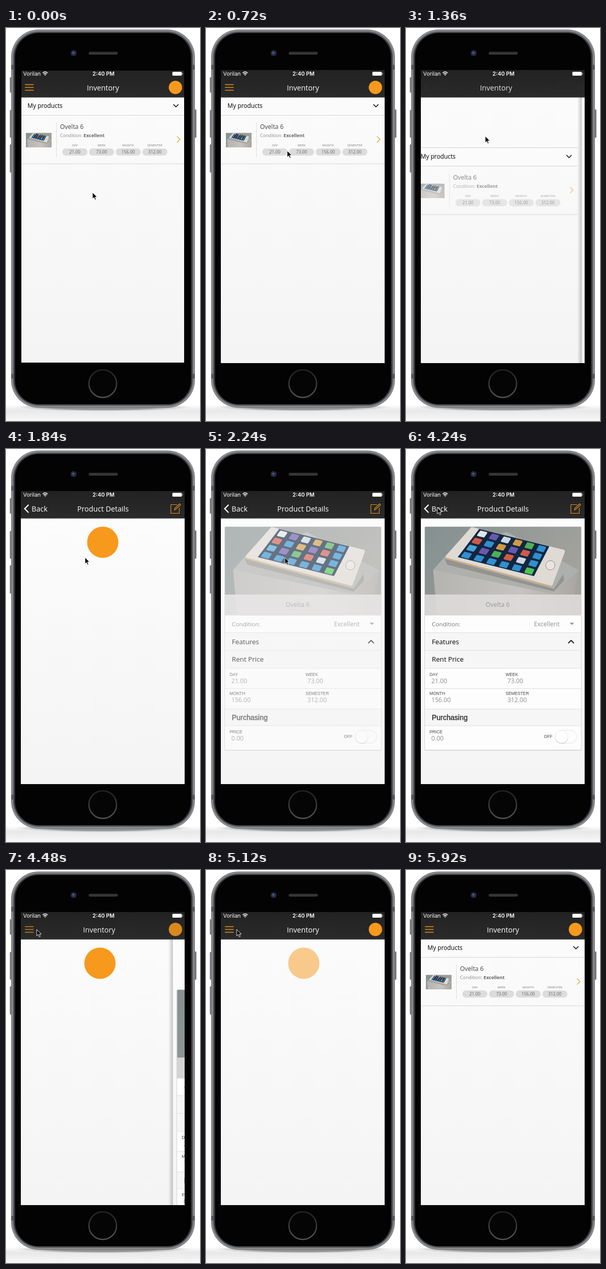
These frames come from a looping animation (379 px wide and 767 px high, 6 s). An HTML page:

```html
<!DOCTYPE html>
<html lang="en">
<head>
<meta charset="utf-8">
<title>Inventory app</title>
<style>
  html, body { margin: 0; width: 100%; height: 100%; overflow: hidden; background: #fff; }
  svg { display: block; width: 379px; height: 767px; }
  text { font-family: "Open Sans", "Noto Sans", sans-serif; }
  .status { font-family: Inter, sans-serif; font-size: 10.5px; fill: #fff; }
  .caps { font-family: "Liberation Sans", Arial, sans-serif; font-size: 8.3px; fill: #444; }
  .title { font-size: 14.2px; fill: #fff; }
  .head { font-size: 13.2px; fill: #000; }
  .value { font-size: 12.1px; fill: #8e8e8e; }
  .mid { text-anchor: middle; }
  .line { fill: none; stroke-linecap: round; stroke-linejoin: round; }
</style>
</head>
<body>
<svg viewBox="0 0 379 767" xmlns="http://www.w3.org/2000/svg">
  <defs>
    <linearGradient id="floor" x2="0" y2="1">
      <stop offset="0" stop-color="#e2e2e2" stop-opacity="0"/><stop offset=".35" stop-color="#e8e8e8"/><stop offset="1" stop-color="#f8f8f8"/>
    </linearGradient>
    <radialGradient id="contact">
      <stop offset=".6" stop-color="#555" stop-opacity=".6"/><stop offset="1" stop-color="#999" stop-opacity="0"/>
    </radialGradient>
    <linearGradient id="page" x2="0" y2="1">
      <stop offset="0" stop-color="#fcfcfc"/><stop offset="1" stop-color="#f4f4f4"/>
    </linearGradient>
    <linearGradient id="bar" x2="0" y2="1">
      <stop offset="0" stop-color="#222"/><stop offset="1" stop-color="#2a2a2a"/>
    </linearGradient>
    <linearGradient id="edge">
      <stop offset="0" stop-color="#000" stop-opacity="0"/><stop offset="1" stop-color="#000" stop-opacity=".22"/>
    </linearGradient>
    <linearGradient id="drop" x2="0" y2="1">
      <stop offset="0" stop-color="#000" stop-opacity=".1"/><stop offset="1" stop-color="#000" stop-opacity="0"/>
    </linearGradient>
    <linearGradient id="wall" x2="1" y2=".4">
      <stop offset="0" stop-color="#849090"/><stop offset="1" stop-color="#a3a29d"/>
    </linearGradient>
    <linearGradient id="boxFront" x2="1" y2="0">
      <stop offset="0" stop-color="#b5b4b1"/><stop offset=".6" stop-color="#c6c3c0"/><stop offset="1" stop-color="#a9a5a1"/>
    </linearGradient>
    <linearGradient id="rim" x2="0" y2="1">
      <stop offset="0" stop-color="#222"/><stop offset="1" stop-color="#555"/>
    </linearGradient>
    <clipPath id="screen"><rect x="29" y="82" width="320" height="572"/></clipPath>
    <clipPath id="photoClip"><rect width="305" height="172" rx="1"/></clipPath>
    <g id="photo" clip-path="url(#photoClip)">
      <rect width="305" height="172" fill="url(#wall)"/>
      <path d="M16 84L50 46L160 10L300 84L284 172H24Z" fill="#aeb0ad"/>
      <path d="M16 84L246 130L300 86L284 172H24Z" fill="url(#boxFront)"/>
      <path d="M38 62L252 121L270 92L272 104L252 126L44 74Z" fill="#7c7873" opacity=".5"/>
      <path d="M44 58L92 4L270 48L246 112Z" fill="#dfdad4" stroke="#dfdad4" stroke-width="7" stroke-linejoin="round"/>
      <path class="line" d="M41 61L246 116" stroke="#cfae80" stroke-width="2.5"/>
      <path d="M106 4L243 38L213 96L64 59Z" fill="#13263f"/>
      <g id="icons"></g>
      <circle cx="245" cy="75" r="9" fill="#e8e4df" stroke="#8f8981"/>
    </g>
  </defs>

  <rect y="736" width="379" height="31" fill="url(#floor)"/>
  <ellipse cx="189.500" cy="740" rx="172" ry="8" fill="url(#contact)"/>
  <g fill="#77797c">
    <rect x="7.500" y="96" width="5" height="30" rx="1.500"/><rect x="7.500" y="160" width="5" height="54" rx="1.500"/>
    <rect x="7.500" y="227" width="5" height="55" rx="1.500"/><rect x="367" y="159" width="5" height="55" rx="1.500"/>
  </g>
  <rect x="10" y="3" width="359" height="738" rx="54" fill="#66686b"/>
  <rect x="12" y="5" width="355" height="734" rx="52" fill="none" stroke="#929496" stroke-width="2"/>
  <path d="M10 72h6v9h-6zM363 72h6v9h-6zM10 675h6v9h-6zM363 675h6v9h-6z" fill="#55575a"/>
  <rect x="15.500" y="8.500" width="348" height="727" rx="48" fill="#2c2d2f"/>
  <rect x="18" y="10" width="343" height="724" rx="46" fill="#030303"/>
  <circle cx="132" cy="49" r="6" fill="#24262d"/><circle cx="132" cy="49" r="3.500" fill="#27376f"/><circle cx="131.500" cy="48" r="1.300" fill="#6879b5"/>
  <rect x="161.500" y="46.500" width="57" height="5.500" rx="2.750" fill="#353535"/>
  <circle cx="189" cy="694" r="27" fill="#050505" stroke="url(#rim)" stroke-width="2.500"/>

  <g clip-path="url(#screen)">
    <rect x="29" y="82" width="320" height="573" fill="url(#page)"/>

    <g id="listPage">
      <circle id="listLoader" cx="191" cy="182" r="30.500" fill="#f7991c"/>
      <g id="list">
        <rect x="29" y="135" width="320" height="35" fill="#fbfbfb"/>
        <path d="M29 134.500H349M29 170.500H349M29 265H349" stroke="#d3d3d3"/>
        <text x="42" y="156" font-size="11.8" fill="#000">My products</text>
        <path class="line" d="M327.500 149.500l4.500 4.500 4.500-4.500" stroke="#111" stroke-width="1.700"/>
        <g id="row">
          <use href="#photo" transform="translate(38.700 204.500) scale(.165)"/>
          <path d="M98.500 184V252" stroke="#ddd"/>
          <text x="105.500" y="197" font-size="12" fill="#444">Ovelta 6</text>
          <text x="105.500" y="213" font-size="9.100" fill="#888">Condition: <tspan font-weight="700" fill="#666">Excellent</tspan></text>
          <g id="pills"></g>
          <path class="line" d="M334.500 212l5.500 5.500-5.500 5.500" stroke="#eca23a" stroke-width="1.400"/>
        </g>
      </g>
    </g>

    <g id="detailPage">
      <rect x="20" y="135" width="9" height="520" fill="url(#edge)"/>
      <rect x="29" y="135" width="320" height="520" fill="url(#page)"/>
      <circle id="detailLoader" cx="189" cy="182" r="30.500" fill="#f7991c"/>
      <g id="card">
        <rect x="36" y="152" width="307" height="437" rx="2" fill="#000" opacity=".1"/>
        <rect x="36.500" y="151.500" width="306" height="436" rx="2" fill="#fdfdfd" stroke="#d6d6d6"/>
        <use href="#photo" x="37" y="152"/>
        <rect x="37" y="284" width="305" height="40" fill="#e0dcdc" opacity=".88"/>
        <text class="mid" x="179" y="308" font-size="12.300" fill="#999">Ovelta 6</text>
        <path d="M37 358h305v70h-305zM37 508h305v32h-305z" fill="#f6f6f6"/>
        <path d="M37 324.500H342M37 358.500H342M37 393H342M37 428H342M37 467.500H342M37 507.500H342M37 540H342" stroke="#dedede"/>
        <text x="50.500" y="346" font-size="11.600" fill="#777">Condition:</text>
        <text class="value" x="250" y="346">Excellent</text>
        <path d="M319.500 339h9l-4.500 4.500z" fill="#999"/>
        <text class="head" x="50.500" y="381">Features</text>
        <path class="line" d="M317.500 378.500l5-5 5 5" stroke="#111" stroke-width="1.800"/>
        <text class="head" x="50.500" y="415">Rent Price</text>
        <g id="prices"></g>
        <text x="50.500" y="529" font-size="14" fill="#222" stroke="#222" stroke-width=".3" style="font-family:'Liberation Sans',Arial,sans-serif">Purchasing</text>
        <text class="caps" x="269.500" y="564">OFF</text>
        <rect x="291.500" y="549" width="42" height="25" rx="12.500" fill="#fdfdfd" stroke="#e4e4e4"/>
        <circle cx="304" cy="563" r="12.500" fill="#000" opacity=".14"/>
        <circle cx="304" cy="561.500" r="12.300" fill="#fff" stroke="#ddd" stroke-width=".6"/>
      </g>
    </g>

    <rect x="29" y="82" width="320" height="53.500" fill="url(#bar)"/>
    <rect x="29" y="135.500" width="320" height="3" fill="url(#drop)"/>
    <g id="listButtons">
      <path class="line" d="M37.500 110.500h16M37.500 116h16M37.500 121.500h16" stroke="#e9921d" stroke-width="1.500"/>
      <circle cx="331" cy="116" r="13" fill="#f7991c"/>
    </g>
    <text class="title mid" id="listTitle" y="121.500">Inventory</text>
    <g id="detailButtons">
      <path class="line" d="M43.500 109.500l-7 7 7 7" stroke="#fff" stroke-width="2.300"/>
      <text class="title" x="50" y="121.500">Back</text>
      <path class="line" d="M334 108.500H322V125.500H338.500V115M329 119l1-3.500 9-8.500 2 2-9 8.500z" stroke="#e8941f" stroke-width="1.100"/>
    </g>
    <text class="title mid" id="detailTitle" y="121.500">Product Details</text>

    <text class="status" x="33.500" y="93">Vorilan</text>
    <g class="line" stroke="#fff" stroke-width="1.500">
      <path d="M72 87.500q4.500-4 9 0M74 89.700q2.500-2.200 5 0"/><circle cx="76.500" cy="91.700" r=".4"/>
    </g>
    <text class="status mid" x="190.500" y="93" font-weight="600">2:40 PM</text>
    <rect x="325" y="85.500" width="18.500" height="7.500" rx="1.500" fill="#fff"/><path d="M344.500 87.500q2 1.700 0 3.500z" fill="#fff"/>
    <rect id="inset" x="29.500" y="82.500" width="319" height="571" fill="none" stroke="#000"/>
  </g>
  <path id="pointer" d="M0 0V12.500L2.900 9.800L5 14.500L7 13.600L5 9H9Z" fill="#000" stroke="#fff" stroke-width=".9"/>
</svg>
<script>
const el = id => document.getElementById(id);
const clamp = v => Math.max(0, Math.min(1, v));
const ramp = (t, from, to) => clamp((t - from) / (to - from));
const mix = (a, b, k) => a + (b - a) * k;
const move = (id, x, y = 0) => el(id).setAttribute("transform", `translate(${x.toFixed(2)} ${y.toFixed(2)})`);
const fade = (id, v) => el(id).setAttribute("opacity", clamp(v).toFixed(3));
const show = (id, on) => { el(id).style.display = on ? "" : "none"; };

const LOOP = 6000, STEP = 80;
const RATES = [["DAY", "21.00"], ["WEEK", "73.00"], ["MONTH", "156.00"], ["SEMESTER", "312.00"]];

// App icons laid out on the tilted handset in the photo
function screenPoint(u, v) {
  const axis = (a, b, c, d) => mix(mix(a, b, u), mix(d, c, u), v);
  return [axis(106, 243, 213, 64), axis(4, 38, 96, 59)];
}
const TINTS = ["#dfe6ea", "#2f8fd0", "#c9d8e2", "#d05a48", "#4fae5a", "#6a58b0", "#4aa3d8", "#d09a44"];
let icons = "";
for (let c = 0; c < 6; c++) for (let r = 0; r < 4; r++) {
  const u = (c + .25) / 6, v = (r + .26) / 4;
  const corners = [[u, v], [u + .08, v], [u + .08, v + .13], [u, v + .13]].map(([a, b]) => screenPoint(a, b).map(n => n.toFixed(1)));
  const tint = c === 5 && r === 3 ? "#4bc452" : TINTS[(c * 5 + r * 3 + c * r) % 8];
  icons += `<path d="M${corners.join("L")}Z" fill="${tint}" stroke="${tint}" stroke-width="3.5" stroke-linejoin="round"/>`;
}
el("icons").innerHTML = icons;

el("pills").innerHTML = RATES.map(([label, price], i) => {
  const x = 134.5 + i * 52.1;
  return `<text class="mid" x="${x}" y="231" font-size="6" fill="#777">${label}</text>
    <rect x="${x - 24.5}" y="235" width="49" height="14" rx="7" fill="#dcdcdc"/>
    <text class="mid" x="${x}" y="245.2" font-size="8.4" fill="#666">${price}</text>`;
}).join("");

const field = (label, price, x, y) =>
  `<text class="caps" x="${x}" y="${y}">${label}</text><text class="value" x="${x + 3.5}" y="${y + 14}">${price}</text>`;
el("prices").innerHTML = RATES.map(([label, price], i) =>
  field(label, price, i % 2 ? 194.5 : 46, i < 2 ? 443 : 479.5)).join("") + field("PRICE", "0.00", 46, 555);

// cubic-bezier(.36, .66, .04, 1)
function glide(x) {
  if (x <= 0 || x >= 1) return x;
  const curve = (s, a, b) => 3 * s * (1 - s) ** 2 * a + 3 * s * s * (1 - s) * b + s ** 3;
  let lo = 0, hi = 1;
  for (let i = 0; i < 24; i++) {
    const s = (lo + hi) / 2;
    if (curve(s, .36, .04) < x) lo = s; else hi = s;
  }
  return curve(lo, .66, 1);
}

const POINTER = [
  [0, 169, 321], [240, 169, 321], [960, 155, 211], [2400, 154, 212], [2720, 98, 263], [3120, 74, 322],
  [3280, 74, 322], [3760, 61, 114], [4240, 61, 114], [4480, 60, 116], [5120, 60, 116], [5520, 169, 373],
  [5680, 169, 373], [5840, 169, 340]
];
function pointerAt(t) {
  const next = POINTER.findIndex(k => k[0] > t);
  if (next < 0) return POINTER.at(-1).slice(1);
  const a = POINTER[next - 1], b = POINTER[next];
  const k = ramp(t, a[0], b[0]), eased = k * k * (3 - 2 * k);
  return [mix(a[1], b[1], eased), mix(a[2], b[2], eased)];
}

function draw(t) {
  const back = t >= 4240;
  const p = back ? 1 - glide(ramp(t, 4245, 4745)) : glide(ramp(t, 1328, 1828));
  const cover = back ? p : p * p;
  const leaving = t >= 1280 && !back;

  move("listPage", -105 * p);
  move("list", 0, leaving ? 99 : 0);
  fade("list", back ? ramp(t, 5120, 5440) : 1);
  fade("row", back ? 1 : 1 - ramp(t, 1280, 1510));
  fade("listLoader", back ? 1 - ramp(t, 5040, 5200) : ramp(t, 1360, 1600));
  show("listLoader", leaving || back);

  show("detailPage", p > 0);
  move("detailPage", 320 * (1 - cover));
  fade("detailLoader", ramp(t, 1360, 1600) * (1 - ramp(t, 1920, 2080)));
  show("detailLoader", !back);
  fade("card", ramp(t, 1920, 2420));
  move("card", 0, t > 4245 ? 82 : 0);

  fade("listButtons", 1 - (back ? 2 : 8) * p);
  move("listTitle", 189.5 - 105 * p);
  fade("listTitle", 1 - p);
  fade("detailButtons", p * p);
  move("detailTitle", 189.5 + 150 * (1 - p));
  fade("detailTitle", p * p);

  show("inset", t < 80);
  show("pointer", t < 5920);
  move("pointer", ...pointerAt(t));
}

const start = performance.now();
function tick() {
  const t = (performance.now() - start) % LOOP;
  draw(Math.floor(t / STEP) * STEP);
  requestAnimationFrame(tick);
}
tick();
</script>
</body>
</html>
```
